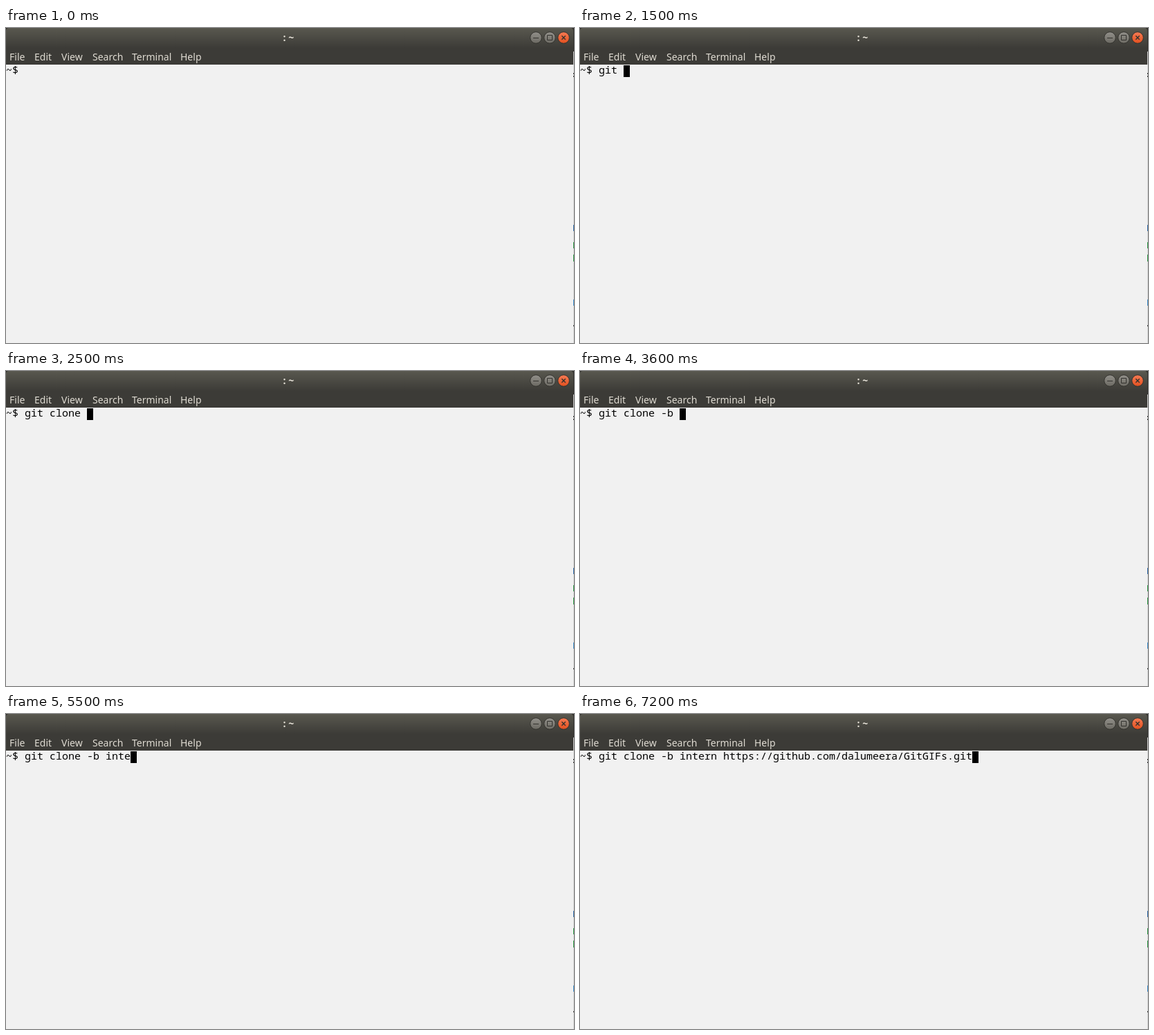
Write an HTML page that moves like this. It is 821 by 456 pixels and loops after 8 s.

```html
<!DOCTYPE html>
<html lang="en">
<head>
<meta charset="utf-8">
<title>Terminal</title>
<style>
  html, body { margin: 0; width: 100%; height: 100%; overflow: hidden; background: #f1f1f1; }
  svg { display: block; width: 821px; height: 456px; }
  .menu { font: 14px "Noto Sans", "Open Sans", sans-serif; fill: #dfdbd2; }
  .title { font: bold 14px "Noto Sans", "Open Sans", sans-serif; fill: #e8e4da; white-space: pre; }
  .shell { font: 15px "Noto Sans Mono", "Liberation Mono", monospace; fill: #000; white-space: pre; }
</style>
</head>
<body>
<svg viewBox="0 0 821 456">
  <defs>
    <linearGradient id="bar" x1="0" y1="0" x2="0" y2="1">
      <stop offset="0" stop-color="#59584f"/>
      <stop offset="1" stop-color="#3c3b37"/>
    </linearGradient>
    <linearGradient id="grey" x1="0" y1="0" x2="0" y2="1">
      <stop offset="0" stop-color="#92908a"/>
      <stop offset="1" stop-color="#6b6962"/>
    </linearGradient>
    <linearGradient id="orange" x1="0" y1="0" x2="0" y2="1">
      <stop offset="0" stop-color="#f57b54"/>
      <stop offset="1" stop-color="#e2501f"/>
    </linearGradient>
  </defs>

  <rect width="821" height="456" fill="#f1f1f1"/>
  <rect width="821" height="53" fill="#3c3b37"/>
  <rect width="821" height="29" fill="url(#bar)"/>
  <path d="M0 0H4Q0 0 0 4ZM820 0H816Q820 0 820 4Z" fill="#2a2926"/>

  <!-- strip of the desktop showing past the right edge -->
  <g id="edge">
    <rect x="820" width="1" height="34" fill="#2c2b28"/>
    <rect x="820" y="34" width="1" height="422" fill="#cfcfcf"/>
  </g>

  <text class="title" x="400.5" y="19">: ~</text>
  <g class="menu" id="menu"></g>

  <g stroke="#33322e" stroke-width="1">
    <circle cx="766" cy="14" r="8.3" fill="url(#grey)"/>
    <circle cx="786" cy="14" r="8.3" fill="url(#grey)"/>
    <circle cx="806" cy="14" r="8.3" fill="url(#orange)"/>
    <path d="M762 14.5H770M782.5 10.5H789.5V17.5H782.5Z" fill="none"/>
    <path d="M803.3 11.3L808.7 16.7M808.7 11.3L803.3 16.7" stroke-width="1.4"/>
  </g>

  <text class="shell" id="line" x="0" y="66"></text>
  <rect id="cursor" y="54" width="9" height="17" fill="#000"/>
</svg>
<script>
  const NS = "http://www.w3.org/2000/svg";
  const byId = id => document.getElementById(id);

  function add(parent, tag, attrs, text = "") {
    const node = document.createElementNS(NS, tag);
    for (const key in attrs) node.setAttribute(key, attrs[key]);
    node.textContent = text;
    parent.appendChild(node);
  }

  const menu = [["File", 5], ["Edit", 41], ["View", 80], ["Search", 125], ["Terminal", 182], ["Help", 252]];
  for (const [label, x] of menu) add(byId("menu"), "text", { x, y: 47 }, label);

  const marks = [
    [65, 2, "#222"], [69, 2, "#222"], [285, 9, "#1f5a9c"], [310, 9, "#1d8a34"],
    [328, 10, "#1d8a34"], [393, 9, "#2d7fc0"], [430, 2, "#333"]
  ];
  for (const [y, height, fill] of marks) add(byId("edge"), "rect", { x: 820, y, width: 1, height, fill });

  const LOOP = 8000;
  const CELL = 9;
  const prompt = "~$ ";
  const command = "git clone -b intern https://github.com/dalumeera/GitGIFs.git";

  // [time in ms, characters typed, cursor hidden]
  const steps = [
    [0, 0, true], [700, 2], [900, 3], [1500, 4], [1700, 6], [2000, 7],
    [2300, 8], [2400, 9], [2500, 10], [3000, 10, true],
    [3400, 11], [3500, 12], [3600, 13], [4200, 13, true], [4600, 13],
    [4800, 14], [5000, 15], [5400, 16], [5500, 17],
    [5900, 18], [6000, 19], [6100, 20], [7200, command.length]
  ];

  const line = byId("line");
  const cursor = byId("cursor");

  function draw(t) {
    const [, typed, hidden] = steps.filter(step => step[0] <= t).pop();
    line.textContent = prompt + command.slice(0, typed);
    cursor.setAttribute("x", (prompt.length + typed) * CELL);
    cursor.setAttribute("visibility", hidden ? "hidden" : "visible");
  }

  const start = performance.now();
  function tick() {
    draw((performance.now() - start) % LOOP);
    requestAnimationFrame(tick);
  }
  tick();
</script>
</body>
</html>
```
